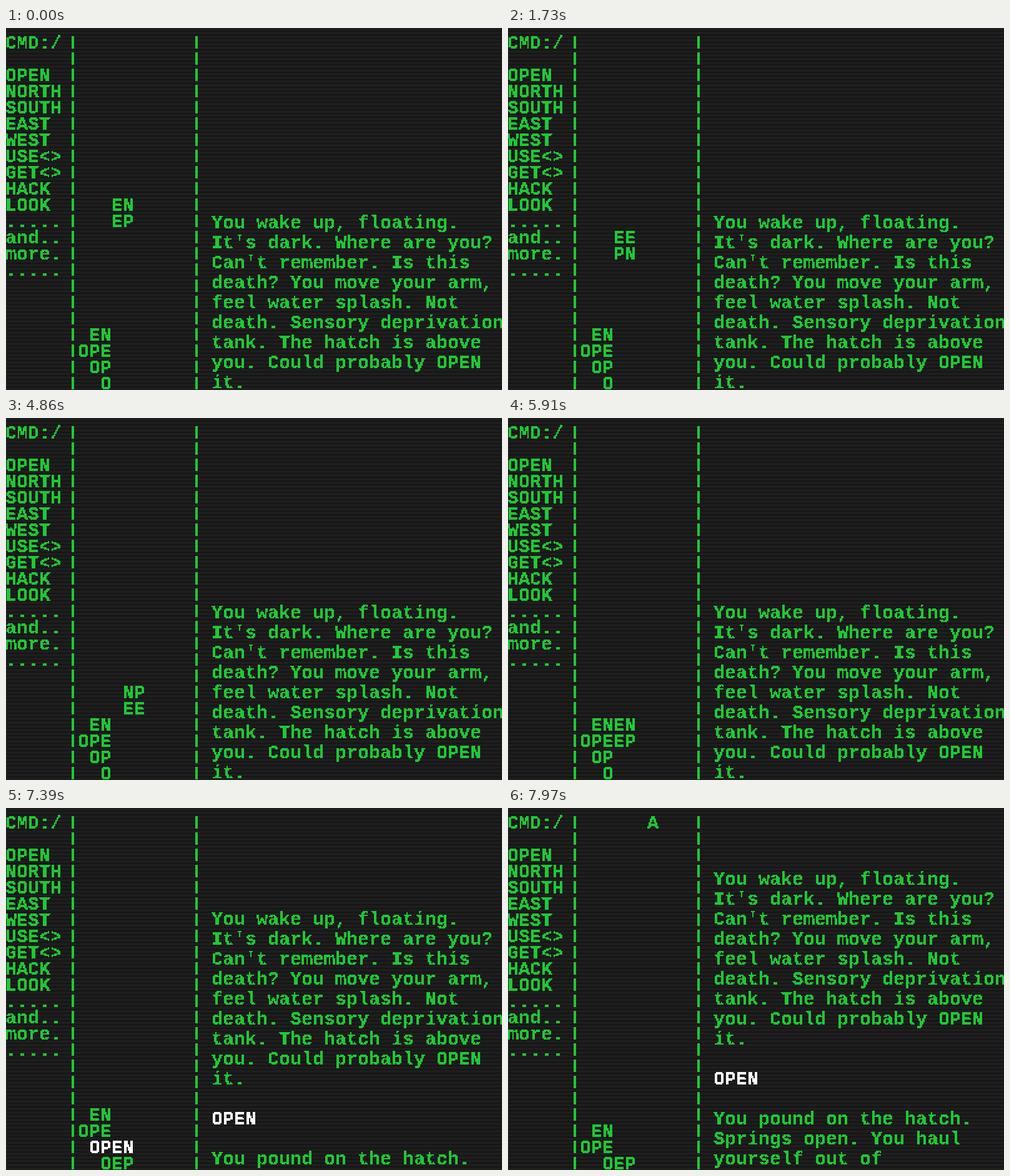
Animation of 794 by 580 pixels, one loop 8 s. Source, as an HTML page with a canvas:

```html
<!DOCTYPE html>
<html lang="en">
<head>
<meta charset="utf-8">
<title>Terminal word blocks</title>
<style>
html, body { margin: 0; width: 100%; height: 100%; overflow: hidden; }
body {
  position: relative;
  background: repeating-linear-gradient(#1e1e1e 0 4px, #151515 4px 6px);
  box-shadow: inset 1px 0 #1a2a2d;
}
canvas { position: absolute; left: -1px; top: -1px; width: 796px; height: 582px; image-rendering: pixelated; }
</style>
</head>
<body>
<canvas id="screen" width="398" height="291"></canvas>
<script>
const LOOP = 8000, GREEN = '#20c835', WHITE = '#ffffff';
const canvas = document.getElementById('screen');
const ctx = canvas.getContext('2d', { willReadFrequently: true });

// The canvas is half size, so one canvas pixel covers 2 x 2 on the stage.
const CELL = 9, ROW = 13, LINE = 16, BASE = 17, FIELD_X = 58, LOG_X = 165;

const MENU = 'CMD:/||OPEN|NORTH|SOUTH|EAST|WEST|USE<>|GET<>|HACK|LOOK|.....|and..|more.|.....'.split('|');
const STACK = [' EN', 'OPE', ' OP', '  O'];
const INTRO = [
  'You wake up, floating.', "It's dark. Where are you?", "Can't remember. Is this",
  'death? You move your arm,', 'feel water splash. Not', 'death. Sensory deprivation',
  'tank. The hatch is above', 'you. Could probably OPEN', 'it.'
];
const REPLY = ['You pound on the hatch. ', 'Springs open. You haul ', 'yourself out of'];

// Falling block: time, column, row, quarter turns
const MOVES = [
  [0, 3, 10, 0], [120, 4, 10, 0], [560, 4, 11, 0], [990, 4, 12, 0], [1450, 4, 12, 1],
  [1730, 3, 12, 1], [1880, 3, 13, 1], [2040, 3, 13, 2], [2470, 4, 13, 2], [2620, 4, 13, 3],
  [2930, 4, 14, 3], [3960, 4, 15, 3], [4860, 4, 16, 3], [5300, 4, 17, 3], [5600, 3, 17, 0],
  [5910, 3, 18, 0], [6500, 3, 20, 0]
];
const MATCH = 6930, CLEAR = 7970;

// Log: time, baseline of the first line, reply letters typed
const LOG = [
  [0, 161, 0], [6930, 129, 0], [7080, 94, 6], [7240, 94, 16], [7390, 94, 25],
  [7510, 78, 33], [7660, 78, 41], [7810, 62, 52], [7970, 62, 62]
];

const latest = (steps, t) => steps.filter(s => s[0] <= t).pop();

function write(text, x, y, color = GREEN) {
  ctx.fillStyle = color;
  [...text].forEach((ch, i) => ctx.fillText(ch, x + i * CELL, y));
}

function drawFrame() {
  MENU.forEach((word, i) => write(word, 0, BASE + i * ROW));
  ctx.fillStyle = GREEN;
  for (let r = 0; r < 22; r++)
    for (const x of [53, 152]) ctx.fillRect(x, 7 + r * ROW, 2, 10);
}

function drawField(t) {
  const put = (text, col, row, color) => write(text, FIELD_X + col * CELL, BASE + row * ROW, color);
  if (t >= CLEAR) {
    put('A', 6, 0);
    [' EN', 'OPE', '  OEP'].forEach((s, i) => put(s, 0, 19 + i));
    return;
  }
  const matched = t >= MATCH;
  STACK.forEach((s, i) => put(s, 0, 18 + i, matched && i === 2 ? WHITE : GREEN));
  const [, col, row, turns] = latest(MOVES, t);
  const ring = 'ENPE';                       // clockwise from the top left
  const at = i => ring[(i - turns + 4) % 4];
  put(at(0) + at(1), col, row, matched ? WHITE : GREEN);
  put(at(3) + at(2), col, row + 1);
}

function drawLog(t) {
  const [, top, typed] = latest(LOG, t);
  const put = (text, line, color) => write(text, LOG_X, top + line * LINE, color);
  INTRO.forEach((text, i) => put(text, i));
  if (t < MATCH) return;
  if (!typed) return put('<color=white>OPE', 10);
  put('OPEN', 10, WHITE);
  let left = typed;
  REPLY.forEach((text, i) => {
    put(text.slice(0, Math.max(0, left)), 12 + i);
    left -= text.length;
  });
}

// Harden soft glyph edges into whole pixels.
function harden() {
  const img = ctx.getImageData(0, 0, canvas.width, canvas.height), d = img.data;
  for (let i = 3; i < d.length; i += 4) d[i] = d[i] > 115 ? 255 : 0;
  ctx.putImageData(img, 0, 0);
}

let shown;
function tick(now) {
  const t = now % LOOP;
  const state = latest(MOVES, t)[0] + ':' + latest(LOG, t)[0];
  if (state !== shown) {
    shown = state;
    ctx.clearRect(0, 0, canvas.width, canvas.height);
    ctx.font = 'bold 15px "Liberation Mono", monospace';
    drawFrame();
    drawField(t);
    drawLog(t);
    harden();
  }
  requestAnimationFrame(tick);
}
tick(performance.now());
</script>
</body>
</html>
```
